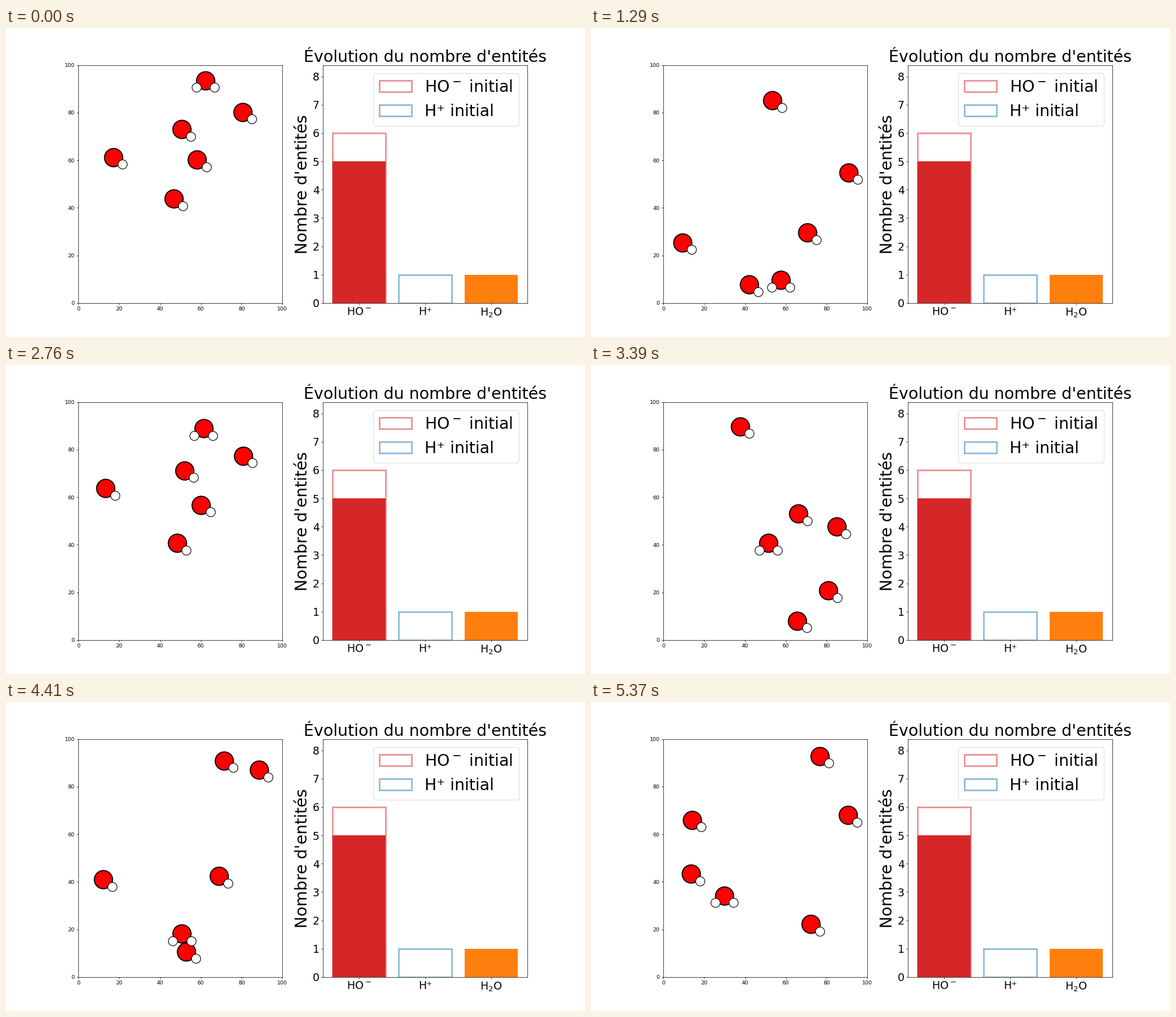
Write a matplotlib script that moves like this. It is 1025 by 547 pixels and loops after 5.4 s.

```python
import numpy as np
import matplotlib.pyplot as plt
from matplotlib.animation import FuncAnimation

WIDTH, HEIGHT = 1025, 547
DPI = WIDTH / 15
INTERVAL, FRAMES, RUN = 30, 180, 90

plt.rcParams["font.family"] = "DejaVu Sans"

# Wall limits for the molecule centres
LOW, HIGH = 6.4, 93.6
TIMES = [0, 23, 43, 71, 89]

# Waypoints per molecule; values beyond a wall are reflected back inside.
WATER = [(62.3, 93.6), (51.5, 40.7), (57.6, 9.7), (43.9, -20.6), (29.9, 34.2)]
HYDROXIDES = [
    [(80.5, 80.3), (84.9, 47.7), (42.1, 7.8), (63.9, -3.6), (72.2, 22.2)],
    [(50.6, 73.0), (66.1, 53.1), (9.3, 25.4), (-8.1, 56.5), (-1.2, 66.0)],
    [(17.0, 61.3), (-24.7, 89.8), (53.5, 102.0), (89.2, 107.3), (76.7, 92.9)],
    [(58.2, 60.2), (80.7, 20.8), (116.6, -16.8), (67.2, 55.1), (13.6, 43.3)],
    [(46.8, 43.9), (65.7, 8.1), (90.7, -42.1), (86.3, 119.3), (96.8, 68.1)],
]
PATHS = np.array([WATER] + HYDROXIDES)


def reflect(position):
    span = HIGH - LOW
    return HIGH - np.abs((position - LOW) % (2 * span) - span)


def centres(step):
    """Positions of all molecules, moving straight between waypoints."""
    leg = min(np.searchsorted(TIMES, step, side="right") - 1, len(TIMES) - 2)
    part = (step - TIMES[leg]) / (TIMES[leg + 1] - TIMES[leg])
    start, end = reflect(PATHS[:, leg]), PATHS[:, leg + 1]
    return reflect(start + (end - start) * part)


# The small margin keeps the pixel size from being rounded down.
fig, (box, chart) = plt.subplots(
    1, 2, figsize=((WIDTH + 1e-3) / DPI, (HEIGHT + 1e-3) / DPI), dpi=DPI)
fig.subplots_adjust(left=0.125, right=0.9, bottom=0.11, top=0.88, wspace=0.2)

box.set(xlim=(0, 100), ylim=(0, 100))


def atoms(size, color, edge, order):
    return box.plot([], [], "o", ms=size, mfc=color, mec="black", mew=edge,
                    zorder=order)[0]


oxygen = atoms(34, "red", 2, 3)
hydrogen = atoms(17, "white", 1.2, 4)


def outline(x, height, color, label):
    chart.bar(x, height, fill=False, edgecolor=color, lw=3, alpha=0.5,
              label=label)


outline(0, 6, "tab:red", "HO$^-$ initial")
outline(1, 1, "tab:blue", "H⁺ initial")
chart.bar([0, 2], [5, 1], color=["tab:red", "tab:orange"])
chart.set(xlim=(-0.54, 2.54), ylim=(0, 8.4), yticks=range(9))
chart.set_xticks(range(3), ["HO$^-$", "H⁺", "H$_2$O"])
chart.tick_params(labelsize=20)
chart.set_title("Évolution du nombre d'entités", fontsize=30)
chart.set_ylabel("Nombre d'entités", fontsize=30)
chart.legend(fontsize=30, loc="upper right")


def update(frame):
    points = centres(frame % RUN)
    oxygen.set_data(*points.T)
    right = points + (4.5, -3)
    left = points[:1] + (-4.5, -3)
    hydrogen.set_data(*np.vstack([right, left]).T)
    return oxygen, hydrogen


animation = FuncAnimation(fig, update, frames=FRAMES, interval=INTERVAL,
                          repeat=True, repeat_delay=0, blit=False)
plt.show()
```
